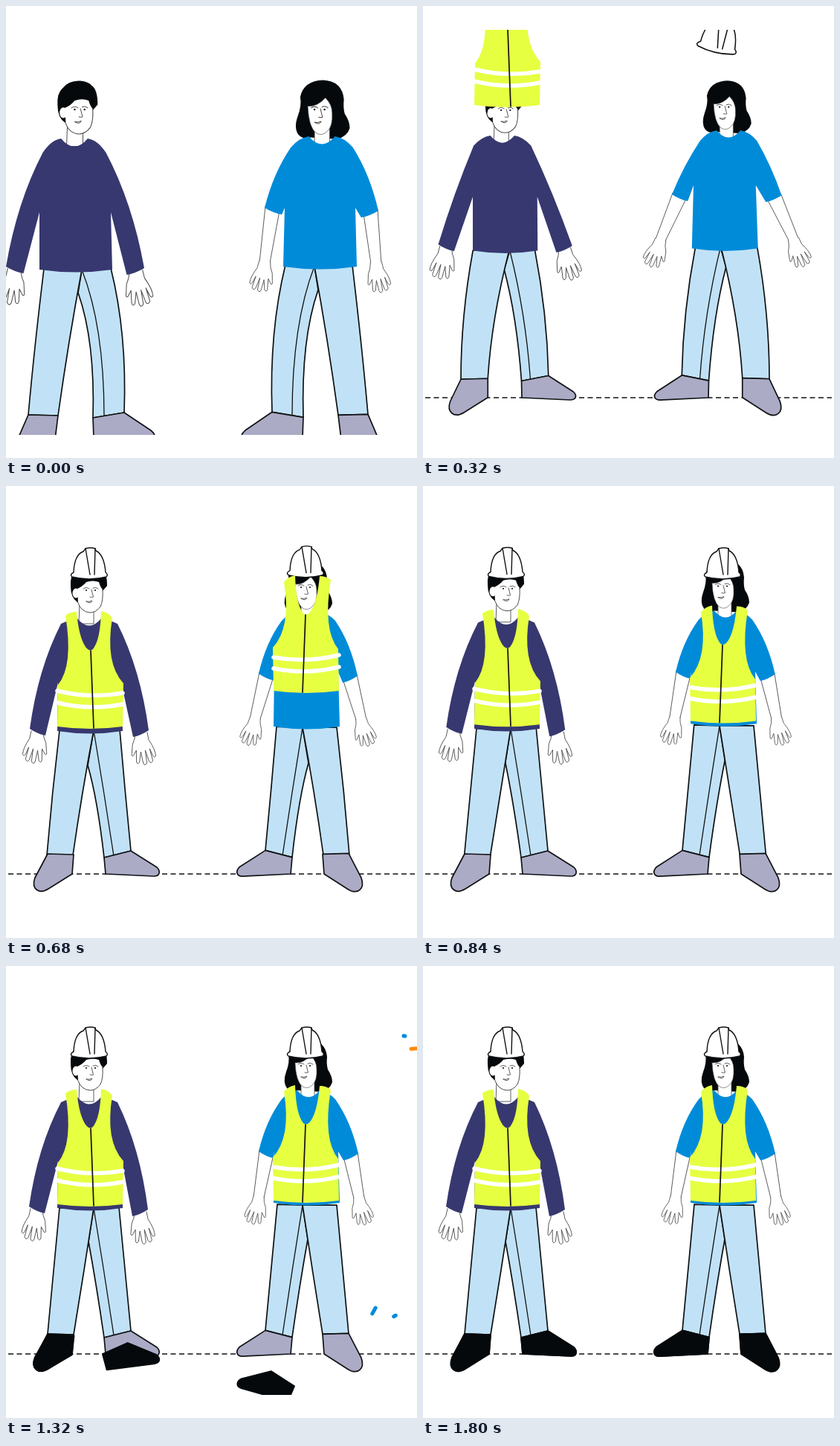
Animation of 553 by 607 pixels, one loop 1840 ms. Source, as an HTML page with a canvas:

```html
<!DOCTYPE html>
<html lang="en">
<head>
<meta charset="utf-8">
<title>Getting dressed for work</title>
<style>
html, body { margin: 0; width: 100%; height: 100%; overflow: hidden; background: #fff; }
canvas { display: block; }
</style>
</head>
<body>
<canvas id="stage" width="553" height="607"></canvas>
<script>
const ctx = document.getElementById('stage').getContext('2d');
const LOOP = 1840, STEP = 40, MIRROR = 517;
const INK = '#101214', THIN = '#4a4a4a', JEANS = '#c1e2f6', SHOE = '#acabc6', BOOT = '#05090b';
const NAVY = '#37386f', BLUE = '#008bd9', LIME = '#e6ff41', ORANGE = '#ff8a0a';

// Poses are given at these times; a short list holds its last pose.
const TIMES = [0, 160, 480, 680, 1000];

const backLeg = [
  'M102 354L141 352Q163 440 159 546L117 553Q120 450 97 385Z',
  'M112 335L149 333Q170 420 168 510L128 517Q127 410 107 354Z',
  'M118 327L151 326Q166 410 169 492L134 499Q126 420 110 354Z',
  'M118 328L153 327Q160 409 168 490L132 499Q123 420 110 375Z',
  'M118 325L152 324Q160 407 168 490L132 499Q122 430 111 370Z'];
const frontLeg = [
  'M51 353Q38 460 30 549L70 550Q84 450 102 354Z',
  'M62 334Q45 420 45 514L82 513Q84 420 112 335Z',
  'M69 326Q53 415 53 497L89 496Q95 420 117 327Z',
  'M72 328Q62 412 55 496L90 496Q102 412 118 328Z',
  'M72 325Q64 410 56 494L91 495Q105 410 118 325Z'];
const seam = [
  'M102 354Q132 430 132 551', 'M114 336Q144 420 143 515', 'M118 327Q136 410 145 497',
  'M118 328Q132 412 145 497', 'M118 325Q132 410 145 496'];
const frontShoe = [
  'M30 549L70 550L66 582L31 603Q20 609 13 604Q7 598 13 588Z',
  'M45 514L82 513L82 540L49 561Q39 567 32 561Q26 556 30 545Z',
  'M53 497L89 496L89 521L57 541Q47 547 41 542Q35 537 39 526Z',
  'M56 494L91 495L89 521L57 541Q47 547 41 542Q35 537 39 526Z'];
const backShoe = [
  'M117 553L159 546L195 570Q201 575 200 579Q199 584 190 584L118 580Z',
  'M128 517L168 510L200 533Q205 537 203 541Q201 544 194 544L130 541Z',
  'M134 499L169 492L203 513Q207 517 206 520Q205 524 199 524L134 521Z',
  'M132 499L168 490L203 512Q207 516 206 520Q205 524 199 524L134 521Z'];

// neck x y, size, shoulder drop, sleeve bulge, cuffs, armpits, hem, wrists
const manTop = [
  [92, 178, 1.12, 19, 10, 0, 350, 186, 352, 45, 141, 277, 45, 143, 354],
  [103, 171, 1.06, 18, 2, 7, 321, 203, 325, 61, 150, 257, 61, 152, 333],
  [108, 175, 1, 12, 3, 25, 320, 200, 321, 69, 155, 256, 69, 155, 327],
  [112, 178, 1, 7, 10, 32, 326, 192, 328, 70, 155, 264, 69, 157, 329],
  [112, 176, 1, 7, 10, 31, 323, 191, 327, 70, 156, 262, 69, 157, 325]];
const womanTop = [
  [425, 175, 1.1, 15, 6, 348, 271, 501, 275, 375, 470, 271, 373, 472, 350, 348, 345, 498, 346],
  [414, 167, 1.04, 15, 3, 335, 253, 490, 255, 367, 453, 240, 364, 456, 330, 320, 318, 505, 320],
  [410, 167, 1, 14, 3, 335, 253, 480, 254, 363, 446, 241, 361, 449, 324, 319, 314, 497, 313],
  [407, 169, .95, 12, 6, 340, 252, 473, 255, 361, 447, 250, 360, 449, 323, 335, 313, 478, 314],
  [407, 167, .95, 12, 6, 340, 249, 474, 252, 361, 447, 249, 360, 449, 318, 340, 311, 475, 312]];
const manHead = [[98, 172, 1.1], [108, 171, 1.05], [111, 170, 1], [113, 170, 1], [113, 167, 1]];
const womanHead = [[423, 173, 1.13], [410, 166, 1.05], [405, 166, 1], [404, 166, 1], [404, 164, 1]];
const ground = [[580], [541], [521]];

// time, dx, dy, turn, size
const hatFall = [[0, -20, -170, 25, 1.15], [160, -8, -62, 13, 1.1], [280, 0, 3, 0, 1],
  [480, 0, -2, 0, 1], [680, 0, 1, 0, 1], [1000, 0, 0, 0, 1]];
const manVest = [[160, -310], [320, -187], [480, -67], [520, -38], [580, 3], [680, 3], [860, 0]];
const womanVest = [[320, -310], [480, -187], [680, -40], [780, 2], [860, 0]];

// peak time, x, y, angle, length, colour
const confetti = [
  [1000, 463, 141, -30, 12, ORANGE], [1000, 480, 127, -55, 12, BLUE],
  [1000, 509, 136, -35, 10, BLUE], [1000, 17, 94, 40, 2, ORANGE],
  [1320, 536, 94, 10, 2, BLUE], [1320, 549, 111, -5, 8, ORANGE],
  [1320, 495, 463, -60, 9, BLUE], [1320, 523, 470, -30, 3, BLUE]];

const NUM = /-?[\d.]+/g;
const rad = d => d * Math.PI / 180;
const lerp = (a, b, u) => a + (b - a) * u;

function mix(a, b, u) {
  if (typeof a !== 'string') return a.map((v, i) => lerp(v, b[i], u));
  const end = b.match(NUM);
  let i = 0;
  return a.replace(NUM, v => lerp(+v, +end[i++], u).toFixed(2));
}

function pose(list, t) {
  const last = list.length - 1;
  let i = TIMES.length - 2;
  while (i > 0 && t < TIMES[i]) i--;
  let u = Math.min(1, (t - TIMES[i]) / (TIMES[i + 1] - TIMES[i]));
  if (i) u = 1 - (1 - u) ** 2;
  return mix(list[Math.min(i, last)], list[Math.min(i + 1, last)], u);
}

function track(keys, t) {
  const i = keys.findIndex(k => k[0] > t);
  if (i === 0) return keys[0].slice(1);
  if (i < 0) return keys[keys.length - 1].slice(1);
  const a = keys[i - 1], b = keys[i];
  return mix(a, b, (t - a[0]) / (b[0] - a[0])).slice(1);
}

function draw(d, fill, line, width = 1.7) {
  const p = new Path2D(d);
  if (fill) { ctx.fillStyle = fill; ctx.fill(p); }
  if (line) { ctx.strokeStyle = line; ctx.lineWidth = width; ctx.stroke(p); }
}

function group(x, y, turn, sx, sy, paint) {
  ctx.save();
  ctx.translate(x, y);
  ctx.scale(sx, sy);
  ctx.rotate(turn);
  paint();
  ctx.restore();
}

function floor(y) {
  ctx.setLineDash([7, 4.5]);
  draw(`M3 ${y}L550 ${y}`, null, INK, 1.7);
  ctx.setLineDash([]);
}

function legs(t) {
  draw(pose(backLeg, t), JEANS, INK);
  draw(pose(seam, t), null, INK, 1.3);
  draw(pose(frontLeg, t), JEANS, INK);
  draw(pose(backShoe, t), SHOE, INK);
  draw(pose(frontShoe, t), SHOE, INK);
}

function boot(list, t, start, cx, turn) {
  const left = 1 - Math.min(1, (t - start) / 280);
  if (left > 1) return;
  group(cx, 515 + 100 * left * left, rad(turn * left), 1, 1, () => {
    ctx.translate(-cx, -515);
    draw(pose(list, t), BOOT, BOOT);
  });
}

function hand(x, y, turn, size, side) {
  group(x, y, turn, size * side, size, () => draw(
    'M-8 -2L-10 8Q-19 22 -19 30Q-17 33 -15 29L-11 20L-15 36Q-13 41 -10 37L-5 22L-7 39Q-4 44 -2 39' +
    'L1 24L3 38Q6 42 7 37L7 22L11 29Q14 31 13 25L12 14Q8 6 8 -2', '#fff', THIN, .9));
}

function arms(k) {
  const [x, y, s, drop, , lx, ly, rx, ry] = k;
  for (const side of [1, -1]) {
    const cx = side > 0 ? lx : rx, cy = side > 0 ? ly : ry;
    if (k.length < 16) {
      const slope = Math.atan2((x - 38 * s * side - cx) * side, cy - y - drop);
      hand(cx + 10 * s * side, cy + 5, slope - .27, s, side);
      continue;
    }
    const wx = side > 0 ? k[15] : k[17], wy = side > 0 ? k[16] : k[18];
    const slope = Math.atan2((cx + 10 * side - wx) * side, wy - cy);
    draw(`M${cx + side} ${cy - 2}L${wx - 7 * side} ${wy}L${wx + 7 * side} ${wy}L${cx + 20 * side} ${cy + 4}`, '#fff');
    draw(`M${cx + side} ${cy - 2}L${wx - 7 * side} ${wy}M${wx + 7 * side} ${wy}L${cx + 20 * side} ${cy + 4}`, null, THIN, .9);
    hand(wx, wy, slope * .6, .9 * s ** .5, side);
  }
}

function shirt(k, colour) {
  const [x, y, s, drop, bulge, lx, ly, rx, ry, al, ar, ay, hl, hr, hy] = k;
  const neck = 16 * s, out = 38 * s, bend = 28 * s, cuff = 21 * s, sy = y + drop;
  draw(`M${x - neck} ${y}Q${x} ${y + 19 * s} ${x + neck} ${y}Q${x + bend} ${y + 2} ${x + out} ${sy}` +
    `Q${(x + out + rx) / 2 + bulge} ${(sy + ry) / 2 - bulge} ${rx} ${ry}` +
    `Q${rx - cuff / 2} ${ry + 7} ${rx - cuff} ${ry + 9}L${ar} ${ay}L${hr} ${hy}` +
    `Q${(hl + hr) / 2} ${hy + 7} ${hl} ${hy}L${al} ${ay}L${lx + cuff} ${ly + 9}` +
    `Q${lx + cuff / 2} ${ly + 7} ${lx} ${ly}` +
    `Q${(x - out + lx) / 2 - bulge} ${(sy + ly) / 2 - bulge} ${x - out} ${sy}` +
    `Q${x - bend} ${y + 2} ${x - neck} ${y}Z`, colour);
}

function features(x) {
  group(x, 0, 0, 1, 1, () => {
    ctx.fillStyle = INK;
    for (const ex of [-5, 7]) {
      ctx.beginPath();
      ctx.arc(ex, -30, 1.1, 0, 7);
      ctx.fill();
    }
    draw('M-9 -32Q-5 -35 -1 -32M4 -33Q8 -35 11 -32M2 -31L4.500 -21Q3 -20 0 -21', null, THIN, .9);
    draw('M-5 -15Q-1 -14 3 -16Q1 -11 -5 -15', null, THIN, .9);
  });
}

function manFace() {
  draw('M-14 -12L-15 15L5 15L5 -4', '#fff', THIN, .9);
  draw('M-17 -14Q-26 -20 -26 -35Q-27 -50 -20 -56Q-12 -66 2 -65Q12 -64 16 -59Q23 -54 23 -36L17 -29L0 -20L-15 -12Z', BOOT);
  draw('M-16 -13L-17 -32Q-10 -35 -5 -41Q4 -44 12 -41Q14 -34 17 -31Q18 -16 14 -8Q8 0 0 0Q-12 -1 -16 -13Z', '#fff');
  draw('M17 -31Q18 -16 14 -8Q8 0 0 0Q-12 -1 -16 -13', null, THIN, 1);
  ctx.beginPath();
  ctx.ellipse(-19, -26, 4.5, 6.5, 0, 0, 7);
  ctx.fillStyle = '#fff';
  ctx.fill();
  features(0);
}

function womanFace() {
  draw('M3 -65Q-20 -64 -24 -45Q-22 -35 -27 -22Q-32 -8 -26 0Q-20 6 -12 3L20 5Q32 2 35 -8Q35 -16 29 -25' +
    'Q27 -32 28 -42Q26 -64 3 -65Z', BOOT);
  draw('M-7 -6L-7 14L11 14L11 -8', '#fff', THIN, .8);
  draw('M-15 -34Q-4 -33 6 -44Q14 -36 14 -26Q15 -10 8 -4Q2 2 -5 -2Q-14 -9 -15 -34Z', '#fff', THIN, .6);
  features(-2);
}

function head(keys, t, face) {
  const [x, y, s] = pose(keys, t);
  group(x, y, 0, s, s, face);
}

function hat(x, t) {
  const [dx, dy, turn, s] = track(hatFall, t);
  group(x + dx, 119 + dy, rad(turn), s, s, () => {
    draw('M-21 -4Q-20 -28 -8 -32L-5 -36Q2 -38 8 -36L9 -33Q20 -28 22 -4Q26 -1 23 2Q0 8 -23 2Q-27 -1 -21 -4Z', '#fff', INK, 1.4);
    draw('M-5 -36L1 -1M8 -36L7 -1', null, INK, 1.4);
  });
}

function vest(x, side, dy) {
  group(x, dy, 0, side, 1, () => {
    draw('M80 171Q86 166 95 166Q98 200 107 213Q114 222 119 213Q127 200 128 165Q138 167 143 174' +
      'Q133 235 158 262L157 320Q113 326 69 320L70 264Q91 238 80 171Z', LIME);
    draw('M69 272Q113 283 157 275M69 288Q113 299 157 290', null, '#fff', 5.5);
    draw('M114 218L118 322', null, INK);
  });
}

function spark(t, [peak, x, y, angle, len, colour]) {
  const p = (t - peak) / 240;
  if (Math.abs(p) >= .5) return;
  const half = len * Math.cos(p * Math.PI) / 2;
  group(x, y, rad(angle), 1, 1, () => draw(`M${50 * p - half} 0L${50 * p + half} 0`, null, colour, 5));
}

function scene(t) {
  ctx.fillStyle = '#fff';
  ctx.fillRect(0, 0, 553, 607);
  ctx.save();
  ctx.beginPath();
  ctx.rect(0, 32, 553, 544);
  ctx.clip();
  ctx.lineJoin = 'round';

  const [g] = pose(ground, t);
  const flip = paint => group(MIRROR, g, 0, -1, 1.02, () => {
    ctx.translate(0, -g);
    paint();
  });
  const man = pose(manTop, t), woman = pose(womanTop, t);

  ctx.lineCap = 'butt';
  floor(g);
  ctx.lineCap = 'round';
  legs(t);
  flip(() => legs(t));

  head(manHead, t, manFace);
  arms(man);
  shirt(man, NAVY);
  hat(112, t);
  vest(0, 1, track(manVest, t)[0]);

  head(womanHead, t, womanFace);
  arms(woman);
  shirt(woman, BLUE);
  hat(403, t - 160);
  vest(MIRROR, -1, track(womanVest, t)[0] - 5);

  boot(frontShoe, t, 1060, 65, 25);
  boot(backShoe, t, 1150, 169, -25);
  flip(() => {
    boot(backShoe, t, 1242, 169, -25);
    boot(frontShoe, t, 1330, 65, 25);
  });
  confetti.forEach(c => spark(t, c));
  ctx.restore();
}

let start;
function tick(now) {
  if (start === undefined) start = now;
  scene(Math.floor((now - start) % LOOP / STEP) * STEP);
  requestAnimationFrame(tick);
}
scene(0);
requestAnimationFrame(tick);
</script>
</body>
</html>
```
